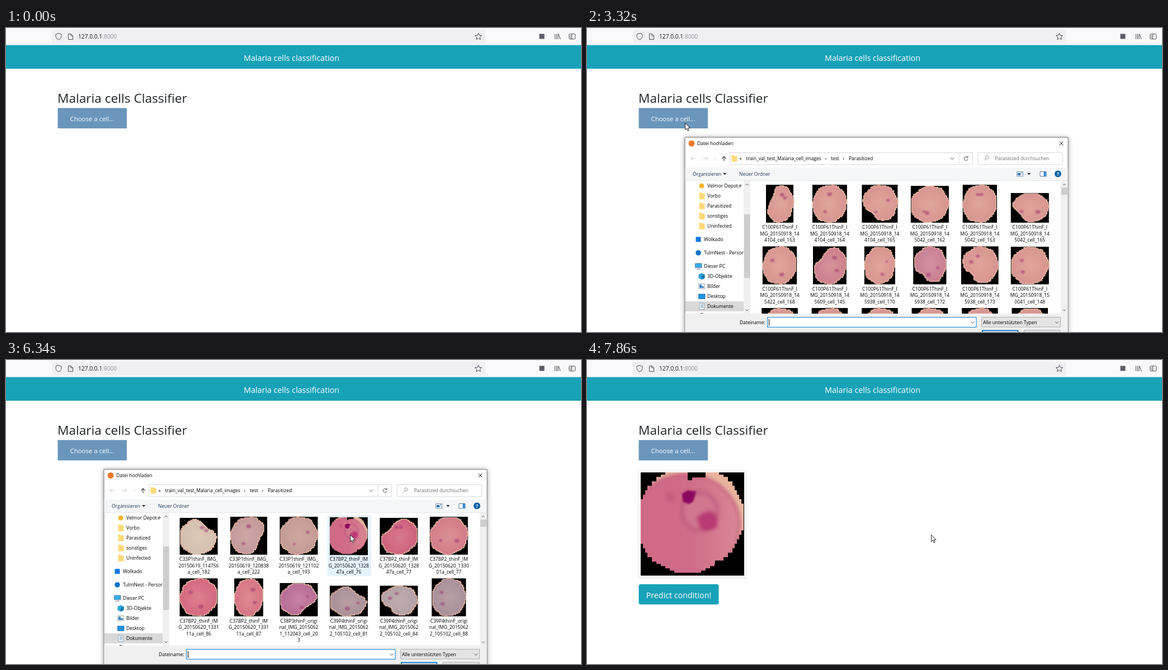
Write an HTML page that moves like this. It is 1028 px wide and 545 px high and loops after 8 s.

```html
<!DOCTYPE html>
<html lang="en">
<head>
<meta charset="utf-8">
<title>Malaria cells classification</title>
<style>
  html, body { margin: 0; width: 100%; height: 100%; overflow: hidden; background: #fff; }
  svg { display: block; width: 100%; height: 100%; }
  text { font-family: "Open Sans", "Noto Sans", sans-serif; font-size: 8.5px; white-space: pre; }
  .line { fill: none; stroke: #4a4a52; stroke-width: 1; }
  .middle { text-anchor: middle; }
  .white { fill: #fff; }
  .muted { fill: #6d6d6d; }
  .navy { fill: #1e395b; }
  .url { font-size: 10.2px; fill: #15141a; }
  .small { font-size: 11.4px; }
  .medium { font-size: 14.3px; }
  .large { font-size: 22.65px; fill: #212529; }
  #window { transform-origin: 517.5px 376px; }
  #frame { filter: drop-shadow(0 1.5px 4px rgba(0, 0, 0, .4)); }
  #card { filter: drop-shadow(0 1.5px 1.5px rgba(0, 0, 0, .12)); }
  .soft { filter: blur(1px); }
  .haze { filter: blur(3px); }
</style>
</head>
<body>
<svg viewBox="0 0 1028 545" preserveAspectRatio="none">
  <defs>
    <radialGradient id="glow">
      <stop offset="0" stop-color="#fff0d8" stop-opacity=".18"/>
      <stop offset="1" stop-color="#fff0d8" stop-opacity="0"/>
    </radialGradient>
    <linearGradient id="pink" x1="0" x2="1">
      <stop offset="0" stop-color="#cf6a85"/>
      <stop offset=".55" stop-color="#cf6c87"/>
      <stop offset="1" stop-color="#da8894"/>
    </linearGradient>
    <clipPath id="treeClip"><path d="M176 274H280V512H176Z"/></clipPath>
    <clipPath id="listClip"><path d="M292 274H847V512H292Z"/></clipPath>
    <clipPath id="photoClip"><path id="photoEdge"/></clipPath>
    <clipPath id="photoBox"><path d="M0 0H185V185H0Z"/></clipPath>
    <g id="photo" clip-path="url(#photoBox)">
      <path d="M0 0H185V185H0Z"/>
      <g clip-path="url(#photoClip)">
        <path d="M0 0H185V185H0Z" fill="#e9b49e"/>
        <g class="haze">
          <ellipse cx="80" cy="95" rx="97" ry="92" fill="url(#pink)" stroke="#c0607f" stroke-width="4"/>
          <ellipse cx="106" cy="70" rx="32" ry="34" fill="#d0768d" stroke="#b94f7d" stroke-width="6" stroke-opacity=".55"/>
          <path d="M100 82Q112 68 128 70Q140 80 136 98Q124 108 108 102Z" fill="#b52c70" fill-opacity=".8"/>
          <circle cx="52" cy="44" r="9" fill="#c05078" fill-opacity=".5"/>
        </g>
        <path d="M74 38L84 32L99 34L94 52L86 57L75 52Z" fill="#8b0760" style="filter:blur(1.5px)"/>
      </g>
      <path d="M84 0H116V9H92V14H84ZM133 158H185V185H133Z"/>
    </g>
  </defs>

  <g id="page">
    <path d="M0 0H1028V30H0Z" fill="#f9f9fb"/>
    <path d="M0 30H1028V31H0Z" fill="#dfe6ea"/>
    <rect x="82" y="3" width="775" height="25" rx="3" fill="#f0f0f4"/>
    <g class="line">
      <path d="M94 9.5L99 11.3V14.5Q99 19 94 21Q89 19 89 14.5V11.3Z"/>
      <path d="M111.5 10.5H116L119.5 14V20.5H111.5ZM116 10.5V14H119.5"/>
      <path id="star"/>
      <path d="M981.5 10.5V20M984.5 10.5V20M987 10.5V20M988 11L991 20"/>
      <rect x="1006.8" y="10.8" width="11" height="9" rx="1.5"/>
      <path d="M1011.5 11V20M1008.5 13.5H1010M1008.5 15.5H1010M1008.5 17.5H1010"/>
    </g>
    <rect x="953.5" y="10.5" width="9" height="9" fill="#5b5b66"/>
    <path d="M0 30.7H1028V73H0Z" fill="#17a2b8"/>
    <path id="choose" d="M92.5 143.5H216V180H92.5Z" fill="#6b96bc"/>
    <text class="url" x="129" y="19.3">127.0.0.1<tspan fill="#8f8f9d">:8000</tspan></text>
    <text class="medium white middle" x="510.5" y="58.5">Malaria cells classification</text>
    <text class="large" x="92" y="133.5">Malaria cells Classifier</text>
    <text class="small white" id="chooseText" x="114.5" y="167">Choose a cell...</text>
  </g>

  <g id="result">
    <path id="card" d="M92.5 197.5H285V390.5H92.5Z" fill="#f8f8f8"/>
    <path d="M96 201.5H281V386.5H96Z" fill="#fff"/>
    <use id="preview" href="#photo" transform="translate(96 201.5)"/>
    <rect x="92.5" y="402" width="143" height="36.3" rx="3.5" fill="#17a2b8"/>
    <text class="medium white middle" x="164" y="427">Predict condition!</text>
  </g>

  <g id="window">
    <path id="frame" d="M175 196H860V557H175Z" fill="#fff" stroke="#757575"/>
    <path d="M175.5 250H859.5V273H175.5Z" fill="#f5f6f7"/>
    <path d="M175.5 512H859.5V556.5H175.5Z" fill="#f0f0f0"/>
    <path d="M175.5 273.5H859.5" stroke="#e6e6e6"/>
    <circle cx="187" cy="207" r="5.5" fill="#f0782c"/>
    <g class="line">
      <path stroke="#222" d="M844.5 203.5L851.5 210.5M851.5 203.5L844.5 210.5"/>
      <path stroke="#c6c6c6" d="M194 234H185.5M189 230.5L185.5 234L189 237.5M207 234H216M212.5 230.5L216 234L212.5 237.5M227.5 233L229.5 235L231.5 233"/>
      <path stroke-width="1.3" d="M245 238.5V230.5M241.3 234L245 230.3L248.7 234"/>
      <path stroke="#d9d9d9" d="M255.5 223.5H689.5V245H255.5ZM665 223.5V245M699 223.5H850.5V245H699Z"/>
      <path d="M649.8 232.5L653 235.7L656.2 232.5M680.5 232A3.4 3.4 0 1 0 681 235M681 230V232.5H678.5"/>
      <path stroke="#888" d="M713.5 234A2.8 2.8 0 1 1 715.5 234.8L713.5 234L710 237.5"/>
    </g>
    <path d="M243 260H249.5L246.2 263.6ZM787 260H793.5L790.2 263.6Z" fill="#333"/>
    <path d="M768.5 257.5H779.5V266H768.5Z" fill="#e8f1f8" stroke="#7b98b2"/>
    <path d="M770 260H775V264H770ZM776 259H778V260.2H776Z" fill="#2b6cab"/>
    <path d="M810 257.5H821V266H810Z" fill="#fff" stroke="#56789a"/>
    <path d="M816.5 258H820.5V265.5H816.5Z" fill="#2a8ad4"/>
    <circle cx="842" cy="261.5" r="6" fill="#0b62a8"/>
    <path d="M705.5 518.5H846.5V536H705.5Z" fill="#e4e4e4" stroke="#adadad"/>
    <path d="M322.5 518.8H696V536.3H322.5Z" fill="#fff" stroke="#0078d7"/>
    <path d="M707 542.3H770.3V556H707Z" fill="#e1e1e1" stroke="#0078d7" stroke-width="1.8"/>
    <path d="M781.5 541.8H846V556H781.5Z" fill="#e1e1e1" stroke="#adadad"/>
    <path class="line" d="M686.5 526.5L689.5 529.5L692.5 526.5M837 526.5L840 529.5L843 526.5"/>
    <text x="197" y="210.3">Datei hochladen</text>
    <text class="navy" x="189" y="264.7">Organisieren</text>
    <text class="navy" x="272" y="264.7">Neuer Ordner</text>
    <text class="white middle" x="842" y="265" font-weight="700">?</text>
    <text x="273" y="530.7">Dateiname:</text>
    <text x="708" y="530.7">Alle unterstützten Typen</text>
    <text class="middle" x="738.5" y="552.5">Öffnen</text>
    <text class="middle" x="814" y="552.5">Abbrechen</text>
    <text id="fileName" x="325" y="530.7">C37BP2_thinF_IMG_20150620_132847a_cell_76</text>
    <g id="loaded">
      <path d="M258.5 228H263L264 229.5H268.5V239.5H258.5Z" fill="#ffd978"/>
      <text x="272.5" y="237">«</text>
      <text x="284.5" y="237">train_val_test_Malaria_cell_images</text>
      <text x="425.5" y="237">›</text>
      <text x="436" y="237">test</text>
      <text x="457.5" y="237">›</text>
      <text x="468" y="237">Parasitized</text>
      <text class="muted" x="729.5" y="237">Parasitized durchsuchen</text>
      <path d="M280 274H292V512H280ZM847 274H859.5V512H847Z" fill="#f0f0f0"/>
      <path d="M281 334H291.5V448H281ZM848 286H859V299H848Z" fill="#cdcdcd"/>
      <path class="line" d="M283.5 282L286 279.5L288.5 282M850.7 282L853.2 279.5L855.7 282M283.5 504.5L286 507L288.5 504.5M850.7 504.5L853.2 507L855.7 504.5"/>
      <g id="tree" clip-path="url(#treeClip)">
        <path d="M175 490H280V508H175Z" fill="#d9d9d9"/>
        <path d="M274 280L277 283L275.5 283.3L273.5 286L270.5 283L273 281.5ZM272 284.5L270 286.8" fill="#8b8f94" stroke="#8b8f94" stroke-width=".7"/>
        <circle cx="205" cy="283" r="4.5" fill="#f4b92c"/>
        <rect x="194.5" y="374.5" width="9" height="9" fill="#1277e0"/>
        <circle cx="199" cy="403" r="4.8" fill="#1173c8"/>
        <path d="M193.5 422H205V429.5H193.5Z" fill="#38aee8" stroke="#45708f" stroke-width=".8"/>
        <path d="M196 431.5H203V432.5H196Z" fill="#667"/>
        <path d="M205 439.5L210.5 442V448.5L205 451L199.5 448.5V442Z" fill="#27a3d8"/>
        <path d="M205 445L210.5 442V448.5L205 451Z" fill="#1274ac"/>
        <path d="M199.5 458.5H210.5V467.5H199.5Z" fill="#f2f7fa" stroke="#8a98a5" stroke-width=".8"/>
        <path d="M201 460H205V463H209V466H201Z" fill="#3f86b8"/>
        <path d="M199.5 477H211V485.5H199.5Z" fill="#1e93df" stroke="#1769a6" stroke-width=".8"/>
        <path d="M201 493.5H209.5V504.5H201Z" fill="#fff" stroke="#7895ae" stroke-width=".8"/>
        <path d="M203 496H208M203 498.5H208M203 501H208" stroke="#3f86b8"/>
        <path d="M202 512Q205 509.5 208 512Z" fill="#555"/>
      </g>
    </g>
    <g clip-path="url(#listClip)">
      <path id="hover" d="M574.5 278.5H653V387.5H574.5Z" fill="#e5f3ff"/>
      <g id="early"></g>
      <g id="sorted"></g>
    </g>
    <path id="caret" d="M325 522H326V534H325Z"/>
  </g>

  <g id="cursor" fill="#fff" stroke="#111" stroke-width=".9" stroke-linejoin="round">
    <path id="arrow" d="M.5 .5V12.6L3.3 10L5.2 14.4L7.2 13.5L5.3 9.3H9.2Z"/>
    <path id="hand" d="M0 1.5Q1.3 -.5 2.6 1.5V6.6Q4.2 5.8 5 7Q6.6 6.4 7.3 7.6Q9 7.4 9 9.2V12Q8.8 14.8 7.4 17.4H.8Q-.6 14.4 -3.8 11.6Q-4.2 9.4 -2.2 10L0 11.4ZM2.6 6.6V9.6M5 7V9.8M7.3 7.6V10"/>
    <circle id="busy" r="7" fill="none" stroke="#3394dd" stroke-width="3"/>
  </g>
</svg>

<script>
const LOOP = 8000, STEP = 70, TURN = 2 * Math.PI;
const $ = id => document.getElementById(id);

function add(parent, tag, attrs, content = '') {
  const node = document.createElementNS('http://www.w3.org/2000/svg', tag);
  for (const key in attrs) node.setAttribute(key, attrs[key]);
  node.textContent = content;
  return parent.appendChild(node);
}

function seeded(seed) {
  return () => {
    const v = Math.sin(++seed * 127.1) * 43758.5453;
    return v - Math.floor(v);
  };
}

// Points around a centre; radius is a function of the angle in turns
const ring = (n, cx, cy, rx, ry, radius) => Array.from({ length: n }, (_, i) => {
  const r = radius(i / n), a = i / n * TURN;
  return [cx + rx * r * Math.cos(a), cy + ry * r * Math.sin(a)];
});

// Closed pixelated outline
function stairs(points, grid) {
  const snap = v => +(Math.round(v / grid) * grid).toFixed(1);
  return points.map(([x, y], i) => i ? `H${snap(x)}V${snap(y)}` : `M${snap(x)} ${snap(y)}`).join('') + 'Z';
}

$('star').setAttribute('d', `M${ring(10, 844.5, 15.5, 6.3, 6.3, t => Math.round(t * 10) % 2 ? .46 : 1)
  .map(([x, y]) => [844.5 + y - 15.5, 15.5 - x + 844.5]).join('L')}Z`);
$('photoEdge').setAttribute('d', stairs(ring(64, 88, 84, 97, 97, () => 1), 4));

// Folder tree: top-level entries start with a dash
let row = 265;
for (const name of ['Velmor Depot', 'Vorbo', 'Parasitized', 'sonstiges', 'Uninfected', '-Wolkado',
  '-TulmNest - Person', '-Dieser PC', '3D-Objekte', 'Bilder', 'Desktop', 'Dokumente']) {
  const top = name[0] === '-';
  row += top ? 24 : 18;
  add($('tree'), 'text', { x: top ? 209 : 215, y: row + 3 }, name.replace(/^-/, ''));
  if (row > 290 && row < 360)
    add($('tree'), 'path', { d: `M200.5 ${row - 6}h4.5l1 1.5h4.5v10.5h-10Z`, fill: '#ffd978' });
}

const column = i => 344.5 + 89.45 * (i % 6);

// Cell picture fitted into a square; dent is the direction of a hollow, in turns
function thumb(parent, i, bottom, { aspect, tone, dent }) {
  const size = 68, w = size * Math.min(1, aspect), h = size / Math.max(1, aspect);
  const cx = column(i), cy = bottom - h / 2;
  if (tone === 'photo') {
    add(parent, 'use', { href: '#photo', transform: `translate(${cx - w / 2} ${bottom - h}) scale(${w / 185})` });
    return;
  }
  const rand = seeded(i * 10), phase = rand() * TURN;
  const hollow = t => {
    const gap = Math.abs((t - dent + 1.5) % 1 - .5);
    return dent === undefined ? 0 : .38 * Math.exp(-((gap / .11) ** 2));
  };
  const radius = t => (.98 + .02 * Math.sin(t * 7 * TURN + phase)) * (1 - hollow(t));
  const d = stairs(ring(56, 0, 0, w / 2, h / 2, radius), 1.8);
  const g = add(parent, 'g', { transform: `translate(${cx} ${cy})` });
  add(g, 'rect', { x: -w / 2, y: -h / 2, width: w, height: h });
  add(g, 'path', { d, fill: tone, stroke: '#e3b3a0', 'stroke-width': 1.4 });
  add(g, 'path', { d, fill: 'url(#glow)' });
  for (let n = 0; n < 2; n++) {
    const a = rand() * TURN, r = 2.5 + 2 * rand();
    add(g, 'ellipse', {
      cx: w * .25 * Math.cos(a), cy: h * .25 * Math.sin(a), rx: r, ry: r * .8,
      fill: '#9c2f70', 'fill-opacity': .55, class: 'soft'
    });
  }
}

function listing(parent, names, cells) {
  names.forEach((lines, i) => {
    thumb(parent, i, i < 6 ? 349 : 459.5, cells[i]);
    lines.forEach((s, n) =>
      add(parent, 'text', { x: column(i), y: (i < 6 ? 360.4 : 470.9) + n * 11.3, class: 'middle' }, s));
  });
}

const cell = (aspect, dent, tone = '#d8958f') => ({ aspect, dent, tone });
const round = undefined;

const stamps = `144104_cell_163 144104_cell_164 144104_cell_165 145042_cell_162 145042_cell_163 145042_cell_165
  145422_cell_168 145609_cell_145 145938_cell_170 145938_cell_172 145938_cell_173 150041_cell_148`;
listing($('early'),
  stamps.split(/\s+/).map(s => `C100P61ThinF_IMG_20150918_${s}`.match(/.{1,14}/g)),
  [cell(.72, .58), cell(.91), cell(.94, .36), cell(1.03), cell(.9), cell(1.28, .4),
   cell(.9), cell(.88, .62, '#cc7f8c'), cell(.81), cell(.87, .35, '#c97f92'), cell(.98, .38), cell(1.01)]);
for (let i = 0; i < 6; i++) thumb($('early'), i, 570, cell(.95));

const beige = 'C33P1thinF_IMG_|20150619_', red = 'C37BP2_thinF_IM|G_20150620_';
const pale = 'C39P4thinF_origi|nal_IMG_2015062|2_105102_cell_';
listing($('sorted'),
  [beige + '114756|a_cell_182', beige + '120838|a_cell_222', beige + '121102|a_cell_193',
   red + '1328|47a_cell_76', red + '1328|47a_cell_77', red + '1330|01a_cell_77',
   red + '1331|11a_cell_86', red + '1331|11a_cell_87',
   'C38P3thinF_origi|nal_IMG_2015062|1_112043_cell_20|3', pale + 81, pale + 84, pale + 88].map(s => s.split('|')),
  [cell(1.03, .86, '#d6bfae'), cell(.97, .07, '#c3999a'), cell(1, round, '#c49a95'),
   cell(1.01, round, 'photo'), cell(1.03, .62, '#cf617d'), cell(1, round, '#d37b88'),
   cell(1, round, '#d4687f'), cell(.76, round, '#d67485'), cell(1.14, .13, '#b96c97'),
   cell(1.24, .87, '#aa8f98'), cell(1.24, .38, '#b3a0a5'), cell(.9, round, '#a98f9a')]);

// Motion: tables of [ms, value]
function play(node, prop, table, easing = 'step-end') {
  const frames = table.map(([t, v]) => ({ offset: t / LOOP, [prop]: v, easing }));
  frames.push({ ...frames.at(-1), offset: 1 });
  node.animate(frames, { duration: LOOP, iterations: Infinity });
}

// Shown and hidden in turn at the given times
const toggle = (node, ...times) =>
  play(node, 'opacity', [[0, 0], ...times.map((t, i) => [t, i % 2 ? 0 : 1])]);

// Pointer: each leg runs to its goal in eased steps
const at = (x, y) => `translate(${x}px, ${y}px)`;
let spot = [826, 497];
const track = [[0, at(...spot)]];
for (const { start, moves, goal } of [
  { start: 300, moves: 4, goal: [388, 310] },
  { start: 910, moves: 6, goal: [175, 170] },
  { start: 4460, moves: 6, goal: [655, 418] },
  { start: 5060, moves: 6, goal: [615, 313] }
]) {
  for (let k = 1; k <= moves; k++) {
    const p = k / moves, ease = p * p * (3 - 2 * p);
    track.push([start + (k - 1) * STEP, at(...spot.map((v, j) => v + (goal[j] - v) * ease))]);
  }
  spot = goal;
}
play($('cursor'), 'transform', track);
toggle($('arrow'), 300, 1190, 2330);
toggle($('hand'), 1190, 2200);
toggle($('busy'), 2200, 2330);

const tint = (from, to) => [[0, from], [1190, from], [1600, to], [2610, to], [2950, from]];
play($('choose'), 'fill', tint('#6b96bc', '#02a3b6'), 'ease');
play($('chooseText'), 'fill', tint('#ffffff', '#b5d6da'), 'ease');

// Dialog fades and grows in four jumps, and leaves the same way
const level = [[0, 0], [2610, 0], [2610 + 4 * STEP, 1], [6830, 1], [6830 + 4 * STEP, 0]];
play($('window'), 'opacity', level, 'steps(4, start)');
play($('window'), 'transform', level.map(([t, v]) => [t, `scale(${.95 + .05 * v})`]), 'steps(4, start)');

toggle($('loaded'), 3120);
toggle($('early'), 3190, 3450);
toggle($('sorted'), 3450);
toggle($('caret'), 3200, 3730, 4260, 4790, 5320, 5870, 6340, 6490);
toggle($('fileName'), 6560);
play($('hover'), 'opacity', [[0, 0], [5270, 0], [5480, 1]], 'linear');
play($('hover'), 'fill', [[0, '#e5f3ff'], [6490, '#cce8ff']]);

toggle($('result'), 7100);
play($('preview'), 'opacity', [[0, 0], [7290, 0], [7860, 1]], 'ease-in-out');
</script>
</body>
</html>
```
